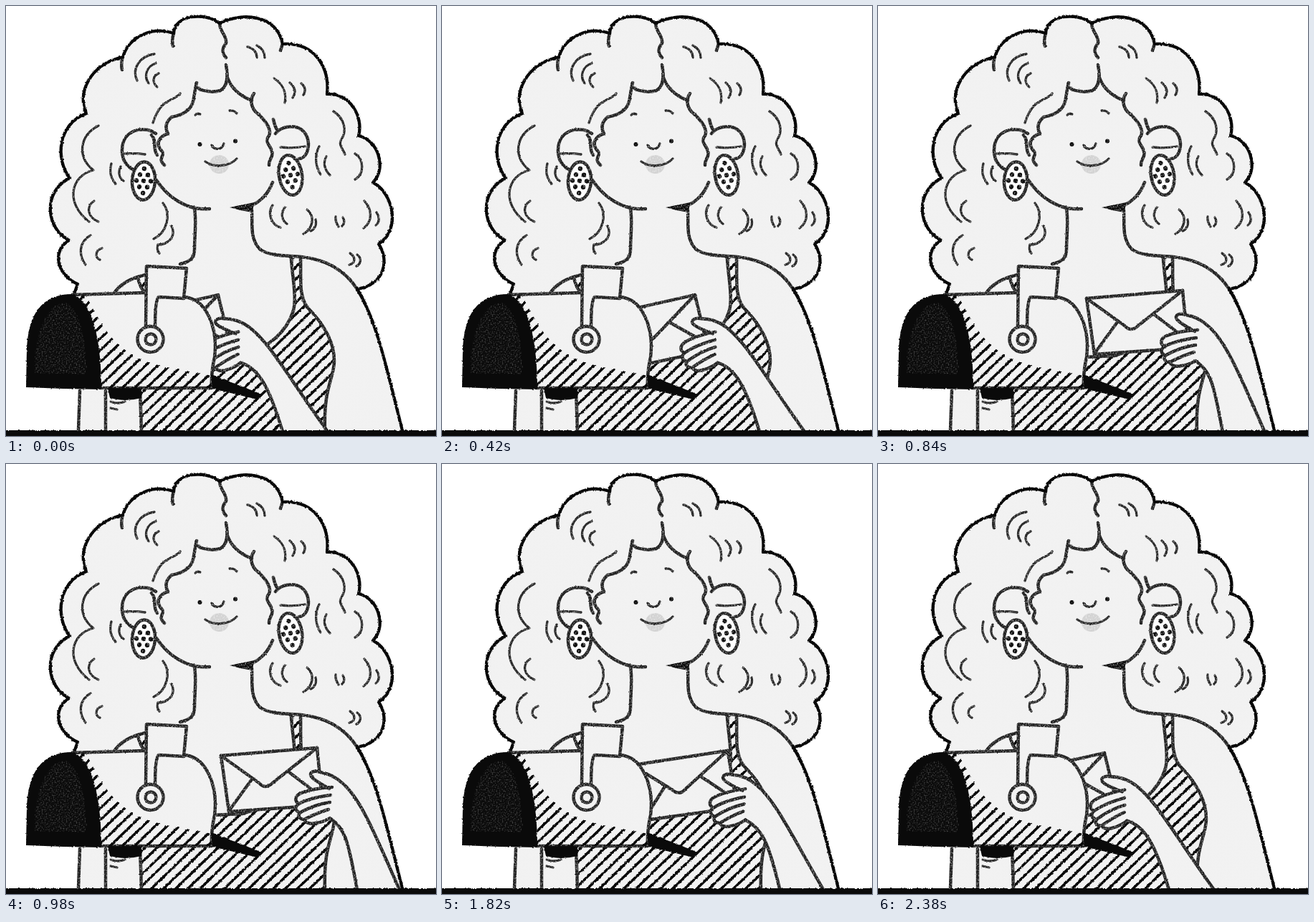
Write an HTML page that moves like this. It is 600 by 600 pixels and loops after 2.52 s.

```html
<!DOCTYPE html>
<html lang="en">
<head>
<meta charset="utf-8">
<title>Letter from the mailbox</title>
<style>
html, body { margin: 0; width: 100%; height: 100%; overflow: hidden; background: #fff; }
svg { display: block; width: 100vw; height: 100vh; }
path, circle, ellipse { stroke-linecap: round; stroke-linejoin: round; }
.skin { fill: #f2f2f2; }
.line { fill: none; stroke: #202020; stroke-width: 4.5; }
.thin { fill: none; stroke: #262626; stroke-width: 3.3; }
.shape { fill: #f2f2f2; stroke: #202020; stroke-width: 4.5; }
.edge { fill: none; stroke: #080808; stroke-width: 4.3; }
.hatch { fill: none; stroke: #080808; stroke-width: 3.5; }
.ink { fill: #0a0a0a; }
</style>
</head>
<body>
<svg viewBox="0 0 600 600">
  <defs id="defs">
    <path id="hair" d="M95 402L100 388C71 375 63 342 88 327C57 312 49 260 89 240C69 215 71 165 112 150C99 122 116 82 163 71C172 42 205 28 234 38C235 12 278 8 298 24C330 8 378 12 386 53C430 50 452 85 448 123C481 122 499 155 492 181C521 188 531 228 512 246C541 262 551 312 520 332C535 355 529 388 490 395"/>
    <clipPath id="shirtClip"><path d="M189 592V533L288 490L330 488C365 478 392 455 401 425C406 405 399 375 398 352L411 352C412 380 408 402 420 420C440 440 458 465 458 495C458 520 443 530 445 592Z"/></clipPath>
    <clipPath id="boxClip"><path d="M98 404L112 404C130 440 148 478 196 496C230 507 260 510 287 516L286 533H133C133 480 125 425 98 404Z"/></clipPath>
    <clipPath id="strapClip"><path d="M184 379L196 374V402C190 396 187 388 184 379Z"/></clipPath>
  </defs>

  <g filter="url(#pencil)">
    <use href="#hair" class="skin"/>
    <path class="skin" d="M150 402C160 386 180 378 250 357H412C450 355 475 372 490 395C518 440 532 510 553 592H101V400Z"/>

    <!-- curls -->
    <path class="line" d="M163 71Q160 80 162 89M234 38Q231 47 233 56M386 53L383 62M298 24C298 36 309 42 307 52C302 58 300 64 307 72M307 82C310 98 310 112 299 118C288 121 274 119 267 114M309 100C315 117 328 126 343 132"/>
    <path class="line" d="M266 107C262 122 263 136 256 143C249 151 240 153 231 155C222 163 222 171 226 178C214 182 208 192 217 202C224 208 210 212 221 222M203 180C211 188 204 200 211 208M346 122C339 132 343 144 351 150C363 161 371 172 367 181C359 190 370 195 371 203C374 210 366 214 367 222M373 158Q375 168 379 174"/>
    <path class="thin" d="M207 67C186 70 175 88 183 104M209 80C196 84 192 98 199 108M213 94C204 98 204 107 211 113M243 122C236 133 216 127 205 163M337 57C345 59 350 64 350 72M350 55C358 59 361 65 361 72M374 101C386 109 392 119 389 135M396 107C404 114 405 121 400 128M412 108C418 113 418 119 415 124"/>
    <path class="thin" d="M129 167C102 181 99 211 122 229C90 237 82 275 116 301M123 272C111 280 114 295 129 301M147 220C144 230 146 241 153 248M160 224C156 232 158 240 164 244M118 320C103 328 100 346 111 361M134 338C124 341 124 351 131 354M219 275C231 290 225 316 206 325M231 307C238 322 226 333 212 333Q210 341 214 345"/>
    <path class="thin" d="M457 147C474 158 475 176 468 186C463 194 471 200 473 207M437 196C430 209 432 225 439 235M447 210C441 220 446 230 452 236M487 206C500 214 500 235 487 242M372 278C364 290 371 306 383 309M389 281C382 290 386 300 392 304M420 284C432 294 428 311 415 318M432 298C434 306 430 312 425 314M460 294C459 301 462 305 464 308M470 295C473 300 472 304 469 307M500 272C511 284 512 300 499 310M517 288C522 295 521 302 516 306M480 345C488 350 488 359 479 361M490 347C497 352 495 360 489 363"/>

    <!-- face and neck -->
    <path class="line" d="M209 178C193 166 163 172 162 200C161 218 174 230 184 229M376 178C386 164 420 162 422 192C422 205 416 213 409 213"/>
    <path class="thin" d="M166 206Q180 205 194 207M383 197Q400 199 417 196"/>
    <path class="line" d="M210 243C225 266 252 286 284 283M372 246C367 260 356 272 342 279M263 283C266 300 263 322 263 340C263 352 256 357 243 360M343 285C344 305 340 326 355 340C370 350 395 348 412 350C450 354 475 372 490 395M150 402C160 386 176 379 195 375"/>
    <path class="ink" d="M312 281L346 274L344 288Q328 286 312 281Z"/>
    <ellipse cx="297.500" cy="221" rx="13.500" ry="13" fill="#d3d3d3"/>
    <path class="thin" d="M278 217C290 226 312 224 322 213M287 194C290 201 301 202 304 192M264 152Q267 149 271 151M312 146Q318 145 322 150"/>
    <circle class="ink" cx="270.500" cy="193" r="3"/>
    <circle class="ink" cx="320" cy="188.500" r="3"/>
    <g id="rings"></g>
  </g>

  <g filter="url(#rough)">
    <path class="hatch" data-hatch clip-path="url(#shirtClip)"/>
    <path class="hatch" data-hatch clip-path="url(#strapClip)"/>
    <use href="#hair" class="edge"/>
    <path class="edge" d="M490 395C518 440 532 510 553 592"/>
  </g>
  <path class="line" filter="url(#pencil)" d="M288 490L330 488C365 478 392 455 401 425C406 405 399 375 398 352M411 352C412 380 408 402 420 420C440 440 458 465 458 495C458 520 443 530 445 592M184 379Q187 393 195 402"/>

  <g filter="url(#pencil)">
    <g class="held">
      <path class="shape" d="M300 407L434 396L442 476L311 485Z"/>
      <path class="line" d="M300 407L353 445Q362 455 372 445L434 396M343 440L311 484M395 430L425 453"/>
    </g>
    <path id="armFill" class="skin"/>
    <path id="armLine" class="line"/>
    <g class="held">
      <path class="skin" d="M452 452C440 447 430 441 426 436C422 430 430 427 438 430C452 432 462 438 470 446L476 480L452 494C446 498 440 500 432 501C420 504 414 500 414 496C405 494 405 488 408 486C402 482 403 476 406 473C402 466 404 462 410 460C420 455 440 452 452 452Z"/>
      <path class="line" d="M451 453C440 447 430 441 426 436C422 430 430 427 438 430C452 432 462 438 470 446M455 451C440 452 420 455 410 460C403 464 403 470 407 473M453 462C438 464 420 468 409 474C402 478 404 484 409 486M452 472C438 474 422 480 411 486C406 490 409 495 415 496M450 482C440 485 428 490 418 495C414 500 425 503 432 501C440 500 446 498 452 494"/>
    </g>
  </g>

  <!-- mailbox -->
  <g filter="url(#pencil)">
    <path class="skin" d="M102 530H188V592H102Z"/>
    <path class="line" d="M103 537L101 592M139 537V592M187 537L189 592"/>
    <path class="thin" d="M146 552Q156 556 166 552M146 561L155 563"/>
    <path class="shape" d="M92 403L195 400L248 406C280 408 296 450 291 490Q286 512 287 533H132Z"/>
  </g>
  <g filter="url(#rough)">
    <path class="ink" d="M142 533H189V547Q165 553 145 547Z"/>
    <path class="ink" d="M286 514L355 541L351 549L288 534Z"/>
    <path class="hatch" data-hatch clip-path="url(#boxClip)"/>
    <path class="ink" d="M28 532L29 478C31 430 50 402 92 402C122 412 133 470 133 535L80 534Z"/>
    <path class="ink" d="M-9 592H609V609H-9Z"/>
  </g>
  <path class="ink" filter="url(#coal)" d="M40 512C40 450 58 414 84 414C104 424 112 470 112 514Z"/>
  <g filter="url(#pencil)">
    <path class="shape" d="M196 363L252 366L248 408L213 406Q208 410 208 448H195Z"/>
    <circle class="shape" cx="201.500" cy="465" r="18"/>
    <circle class="shape" cx="202" cy="465" r="7.500"/>
  </g>
</svg>
<script>
const $ = id => document.getElementById(id);
const STEP = 140, LOOP = 2520;

// Wobbly edges plus specks of one colour inside the drawn shapes.
function addFilter(id, wobble, speck, gain, bias) {
  $('defs').insertAdjacentHTML('beforeend', `
    <filter id="${id}" filterUnits="userSpaceOnUse" x="0" y="0" width="600" height="600" color-interpolation-filters="sRGB">
      <feTurbulence type="fractalNoise" baseFrequency=".35" numOctaves="2" seed="4" result="n"/>
      <feDisplacementMap in="SourceGraphic" in2="n" scale="${wobble}" xChannelSelector="R" yChannelSelector="G" result="d"/>
      <feTurbulence type="fractalNoise" baseFrequency=".5" numOctaves="2" seed="9"/>
      <feColorMatrix values="0 0 0 0 ${speck} 0 0 0 0 ${speck} 0 0 0 0 ${speck} ${gain} 0 0 0 ${bias}"/>
      <feComposite in2="d" operator="in" result="s"/>
      <feMerge><feMergeNode in="d"/><feMergeNode in="s"/></feMerge>
    </filter>`);
}
addFilter('pencil', 2, .949, 1.8, -.83);
addFilter('rough', 3, 0, 0, 0);
addFilter('coal', 4, .3, 2.4, -1.1);

let stripes = '';
for (let x = -400; x < 600; x += 17) stripes += `M${x} 600L${x + 310} 300`;
document.querySelectorAll('[data-hatch]').forEach(p => p.setAttribute('d', stripes));

function earring(x, y, ry, turn) {
  let dots = '';
  for (let row = -2; row <= 2; row++) {
    const xs = row % 2 ? [-5.5, 5.5] : row ? [0] : [-10, 0, 10];
    for (const dx of xs) dots += `<circle class="ink" cx="${dx}" cy="${row * 8.5}" r="3.2"/>`;
  }
  return `<g transform="translate(${x} ${y}) rotate(${turn})">
    <ellipse class="shape" style="fill:#fff" rx="16" ry="${ry}"/>${dots}</g>`;
}
$('rings').innerHTML = earring(192, 244, 26.5, 3) + earring(397, 236, 28, -9);

// The hand is drawn with its thumb tip at HOME; each pose moves that point.
const HOME = [425, 432];
const thumbX = [292, 312, 331, 349, 367, 392, 416, 425];
const thumbY = [440, 440, 440, 440, 440, 436.5, 433, 432];

// Arm curves relative to the thumb: control, control, end.
const upper = { reach: [75, 28, 100, 75, 157, 154], rest: [70, 35, 90, 85, 124, 162] };
const lower = { reach: [60, 65, 75, 90, 94, 154], rest: [48, 78, 52, 90, 65, 162] };

function draw(k) {
  const x = thumbX[k], y = thumbY[k];
  const w = Math.min(1, Math.max(0, (k - 4) / 2));
  const turn = -8 * (1 - w), a = turn * Math.PI / 180;
  const joint = (u, v) => [x + u * Math.cos(a) - v * Math.sin(a), y + u * Math.sin(a) + v * Math.cos(a)];
  const blend = c => c.reach.map((v, i) => v + (c.rest[i] - v) * w + (i % 2 ? y : x));
  const top = joint(45, 14), low = joint(27, 62);
  const up = blend(upper), down = blend(lower);

  document.querySelectorAll('.held').forEach(g => g.setAttribute('transform',
    `translate(${x - HOME[0]} ${y - HOME[1]}) rotate(${turn} ${HOME})`));
  $('armLine').setAttribute('d', `M${top}C${up}M${low}C${down}`);
  const [c1, c2, c3, c4, ex, ey] = down;
  $('armFill').setAttribute('d', `M${top}C${up}L${ex} ${ey}C${c3} ${c4} ${c1} ${c2} ${low}Z`);
}

const start = performance.now();
let shown = -1;
function tick() {
  const i = Math.floor((performance.now() - start) % LOOP / STEP);
  const k = i < 7 ? i : i < 12 ? 7 : 18 - i;
  if (k !== shown) draw(shown = k);
  requestAnimationFrame(tick);
}
tick();
</script>
</body>
</html>
```
